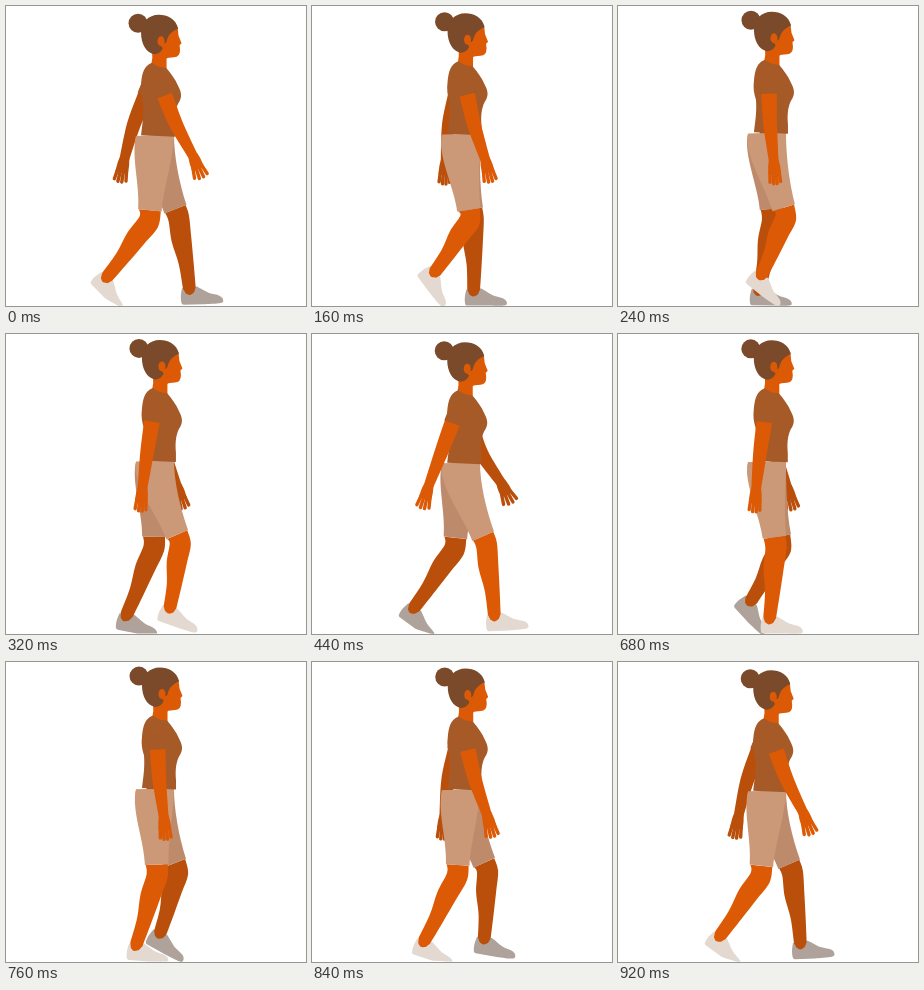
An HTML page with a canvas that plays this animation: 300x300 px, repeating every 0.96 s.

```html
<!DOCTYPE html>
<html lang="en">
<head>
<meta charset="utf-8">
<title>Walk cycle</title>
<style>
  html, body { margin: 0; width: 100%; height: 100%; overflow: hidden; background: #fff; }
  canvas { display: block; width: 300px; height: 300px; }
</style>
</head>
<body>
<canvas id="stage" width="300" height="300"></canvas>
<script>
const ctx = document.getElementById('stage').getContext('2d');
const LOOP = 960, STEP = 40, GROUND = 299.5;

const SHIRT = '#a55a28', HAIR = '#7a4a2b';
const NEAR = { skin: '#dc5a05', shorts: '#cb9977', shoe: '#e4d9d1', bend: 3 };
const FAR = { skin: '#ba4f0b', shorts: '#bd8b6b', shoe: '#aea29b', bend: 10 };

const SHIRT_PATH = new Path2D('M146 57C138 60 136 67 135 78C134 85 135 91 137 97C138 110 136 120 135 129.5' +
  'L169 131L169 122C168 112 169 104 172 98C177 91 175 86 172 80C169 73 165 68 160 62Q152 62 146 57Z');
const FACE_PATH = new Path2D('M160 20L171.5 21L172.5 30L175.5 37.5L173.5 39.5L174 44Q174 51.5 168 51.5' +
  'Q162 51.5 160.5 53L160.5 64L145 60Q147 52 146 44Z');
const HAIR_PATH = new Path2D('M172 23C170 13 161 9 153 9C142 9 135 17 135 27C135 38 140 47 148 48.5' +
  'C154 48 157 44 157 40L160.5 36C162 29 166 25 172 23Z');

const rad = a => a * Math.PI / 180;
const polar = (p, a, r) => [p[0] + r * Math.sin(rad(a)), p[1] + r * Math.cos(rad(a))];
const side = (p, a, w) => [p[0] + w * Math.cos(rad(a)), p[1] - w * Math.sin(rad(a))];
const mix = (a, b, k) => [a[0] + (b[0] - a[0]) * k, a[1] + (b[1] - a[1]) * k];

// Periodic motion: a plain swing, and a 0..1 bump that narrows with power
const swing = (t, peak, turns = 1) => Math.cos(2 * Math.PI * turns * (t - peak) / LOOP);
const bump = (t, peak, power) => ((1 + swing(t, peak)) / 2) ** power;

function curve(pts) {
  ctx.lineTo(...pts[0]);
  for (let i = 0; i < pts.length - 1; i++) {
    const a = pts[i - 1] || pts[i], b = pts[i], c = pts[i + 1], d = pts[i + 2] || c;
    ctx.bezierCurveTo(b[0] + (c[0] - a[0]) / 6, b[1] + (c[1] - a[1]) / 6,
      c[0] - (d[0] - b[0]) / 6, c[1] - (d[1] - b[1]) / 6, ...c);
  }
}

function shape(color, ...edges) {
  ctx.fillStyle = color;
  ctx.beginPath();
  edges.forEach(curve);
  ctx.closePath();
  ctx.fill();
}

function disc(color, x, y, rx, ry = rx) {
  ctx.fillStyle = color;
  ctx.beginPath();
  ctx.ellipse(x, y, rx, ry, 0, 0, 2 * Math.PI);
  ctx.fill();
}

function fillPath(color, path) {
  ctx.fillStyle = color;
  ctx.fill(path);
}

// The sole flattens where it meets the ground
function shoe(color, ankle, angle) {
  const c = Math.cos(rad(angle)), s = Math.sin(rad(angle));
  const place = ([x, y]) => [ankle[0] + x * c - y * s, Math.min(GROUND, ankle[1] + x * s + y * c)];
  shape(color,
    [[-7, 0], [-8.5, 8], [-8, 15], [-6, 16.5]].map(place),
    [[14, 17], [31, 16.5], [33.5, 13], [30, 9], [20, 6], [13, 2], [8, -1]].map(place));
}

function leg(look, t, hip) {
  const thigh = 8 + 12.4 * swing(t, 413) + 1.5 * swing(t, 280, 2);
  const ankle = [142 + 41 * swing(t, 475), 283.5 - 18 * bump(t, 140, 1.5)];
  const foot = 56 * bump(t, 105, 2) - 7 * bump(t, 420, 20);

  const hem = polar(hip, thigh, 65 + thigh * 0.08), knee = polar(hip, thigh, 75);
  const cut = thigh * 1.2;
  const shin = Math.atan2(ankle[0] - knee[0], ankle[1] - knee[1]) * 180 / Math.PI;
  const edge = (k, w) => side(mix(knee, ankle, k), shin, w);

  shoe(look.shoe, ankle, foot);
  shape(look.skin,
    [side(hem, cut, -11), edge(0.04, -10), edge(0.33, -10), edge(0.65, -6.5), edge(1, -6)],
    [edge(1.07, -4), edge(1.1, 0), edge(1.07, 4.5)],
    [edge(1, 6.8), edge(0.65, 8.5), edge(0.3, 10), edge(0, 11), side(hem, cut, 11)]);

  const back = side(hem, cut, -11.8), front = side(hem, cut, 11.8);
  ctx.fillStyle = look.shorts;
  ctx.beginPath();
  ctx.moveTo(hip[0] - 19, hip[1] - 10);
  ctx.bezierCurveTo(hip[0] - 24, hip[1] + 10, ...polar(back, thigh, -24), ...back);
  ctx.lineTo(...front);
  ctx.bezierCurveTo(...polar(front, thigh, -24), hip[0] + 19, hip[1] + 10, hip[0] + 19, hip[1] - 11);
  ctx.fill();
}

function hand(color, wrist, angle, fan) {
  ctx.save();
  ctx.translate(...wrist);
  ctx.rotate(-rad(angle));
  shape(color, [[-4.8, -2], [-6, 5], [-6.3, 13]], [[6.3, 13], [6, 5], [4.8, -2]]);
  ctx.strokeStyle = color;
  ctx.lineWidth = 3.4;
  ctx.lineCap = 'round';
  for (let i = -1.5; i <= 1.5; i++) {
    ctx.beginPath();
    ctx.moveTo(i * 3, 10);
    ctx.lineTo(i * 3 * fan, 23 - Math.abs(i) * 1.8);
    ctx.stroke();
  }
  ctx.restore();
}

function arm(look, t, x, y) {
  const upper = 22 * swing(t, 16);
  const fore = upper * 1.15 + look.bend;
  const shoulder = [x + upper * 0.13, y];
  const elbow = polar(shoulder, upper, 50), wrist = polar(elbow, fore, 36);
  const edge = s => [
    side(shoulder, upper, 8 * s), side(polar(shoulder, upper, 20), upper, 7.8 * s),
    side(elbow, (upper + fore) / 2, 6.8 * s), side(wrist, fore, 4.8 * s)
  ];
  shape(look.skin, edge(-1), edge(1).reverse());
  hand(look.skin, wrist, fore * 0.75, 1.1 + Math.abs(fore) / 70);

  const cuff = polar(shoulder, upper, 18);
  shape(SHIRT,
    [side(shoulder, upper, -8), side(cuff, upper, -8.4)],
    [side(cuff, upper, 8.4), side(shoulder, upper, 8)]);
}

function draw(t) {
  const bob = 1.7 * (swing(t, 35, 2) - 1), sway = -bob * 0.3;
  const hip = [149, 140 + bob * 0.7];
  const half = t + LOOP / 2;

  ctx.fillStyle = '#fff';
  ctx.fillRect(0, 0, 300, 300);

  arm(FAR, half, 149 + sway, 73 + bob);
  leg(FAR, half, hip);
  leg(NEAR, t, hip);

  ctx.save();
  ctx.translate(sway, bob);
  fillPath(NEAR.skin, FACE_PATH);
  disc(HAIR, 132, 17.5, 9.5);
  fillPath(HAIR, HAIR_PATH);
  disc(NEAR.skin, 155, 35.5, 3.5, 5);
  disc(NEAR.skin, 158, 40, 2.5);
  fillPath(SHIRT, SHIRT_PATH);
  ctx.restore();

  arm(NEAR, t, 149 + sway, 73 + bob);
}

const start = performance.now();
function tick() {
  const t = (performance.now() - start) % LOOP;
  draw(Math.floor(t / STEP) * STEP);
  requestAnimationFrame(tick);
}
tick();
</script>
</body>
</html>
```
